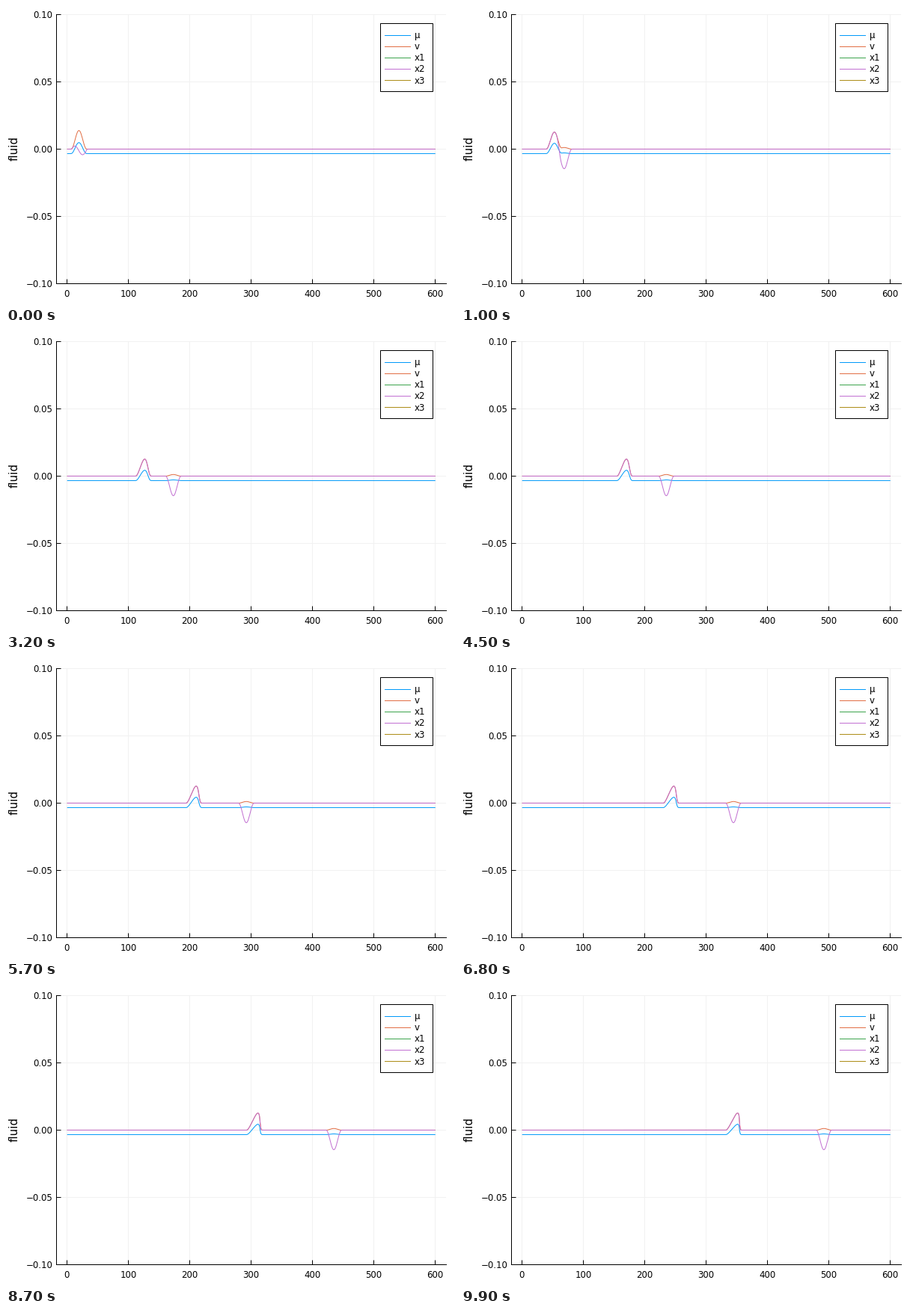
Write a matplotlib script that moves like this. It is 600x400 px and loops after 10 s.

```python
import numpy as np
import matplotlib.pyplot as plt
from matplotlib.animation import FuncAnimation
from matplotlib.lines import Line2D
from matplotlib.patches import Rectangle
from matplotlib.transforms import Affine2D

W, H, DPI = 600, 400, 100
FRAMES, INTERVAL = 100, 100
PX = 72 / DPI  # points per pixel

plt.rcParams["font.family"] = "DejaVu Sans"
plt.rcParams["axes.unicode_minus"] = True

BLUE, ORANGE, GREEN = "#009af9", "#e26f46", "#3da44d"
PURPLE, OLIVE = "#c271d2", "#ac8d18"
LABEL = 11.8 * PX

# Two travelling pulses: a slow one that steepens, a fast one that keeps its shape
HALF = 12.6
SLOW_START, SLOW_SPEED, STEEPEN = 19.45, 3.29, 0.066
FAST_START, FAST_SPEED = 21.3, 4.757
REST = -0.00333

x = np.arange(1, 601)
xi = np.linspace(-HALF, HALF, 401)


def hump(d):
    return np.where(np.abs(d) < HALF, np.cos(np.pi * d / (2 * HALF)) ** 2, 0.0)


def slow_pulse(n):
    h = hump(xi)
    pos = SLOW_START + SLOW_SPEED * n + xi + STEEPEN * n * h
    return np.interp(x, pos, h, left=0, right=0)


def fast_pulse(n):
    return hump(x - FAST_START - FAST_SPEED * n)


fig = plt.figure(figsize=(W / DPI, H / DPI), dpi=DPI, facecolor="white")
left, right, top, bottom = 67.45, 588, 11.45, 371.45
ax = fig.add_axes([left / W, 1 - bottom / H, (right - left) / W, (bottom - top) / H])
ax.set_xlim(-16.97, 617.97)
ax.set_ylim(-0.1, 0.1)
ax.set_xticks(range(0, 601, 100))
ax.set_yticks([-0.1, -0.05, 0, 0.05, 0.1])
ax.yaxis.set_major_formatter("{x:.2f}")
ax.tick_params(direction="in", length=6 * PX, width=PX, labelsize=LABEL)
ax.tick_params(axis="x", pad=7.2 * PX)
ax.tick_params(axis="y", pad=5 * PX)
ax.grid(True, color="#f1f1f1", linewidth=PX)
ax.set_axisbelow(True)
for side in ("top", "right"):
    ax.spines[side].set_visible(False)
for side in ("left", "bottom"):
    ax.spines[side].set_linewidth(PX)

# Pixel coordinates with the origin at the top left
pix = Affine2D().scale(1, -1).translate(0, H) + Affine2D().scale(1 / W, 1 / H) + fig.transFigure

fig.text(11.4, 190.8, "fluid", transform=pix, rotation=90, ha="center", va="center",
         fontsize=15 * PX)


def add_legend():
    fig.add_artist(Rectangle((500.2, 23.4), 70.2, 91, transform=pix, facecolor="white",
                             edgecolor="black", linewidth=PX, zorder=5))
    entries = [("µ", BLUE), ("v", ORANGE), ("x1", GREEN), ("x2", PURPLE), ("x3", OLIVE)]
    for i, (name, color) in enumerate(entries):
        y = 38.9 + 15.1 * i
        fig.add_artist(Line2D([506, 540], [y, y], transform=pix, color=color,
                              linewidth=PX, zorder=6))
        fig.text(545.6, y + 4.3, name, transform=pix, va="baseline",
                 fontsize=LABEL, zorder=6)


add_legend()


def curve(color):
    return ax.plot([], [], color=color, linewidth=PX, zorder=3)[0]


mu, v, x2 = curve(BLUE), curve(ORANGE), curve(PURPLE)


def update(n):
    slow, fast = slow_pulse(n), fast_pulse(n)
    mu.set_data(x, REST + 0.0077 * slow + 0.0005 * fast)
    v.set_data(x, 0.0127 * slow + 0.0012 * fast)
    x2.set_data(x, 0.0127 * slow - 0.0146 * fast)
    return mu, v, x2


anim = FuncAnimation(fig, update, frames=FRAMES, interval=INTERVAL, repeat=True,
                     repeat_delay=0, blit=False)
plt.show()
```
